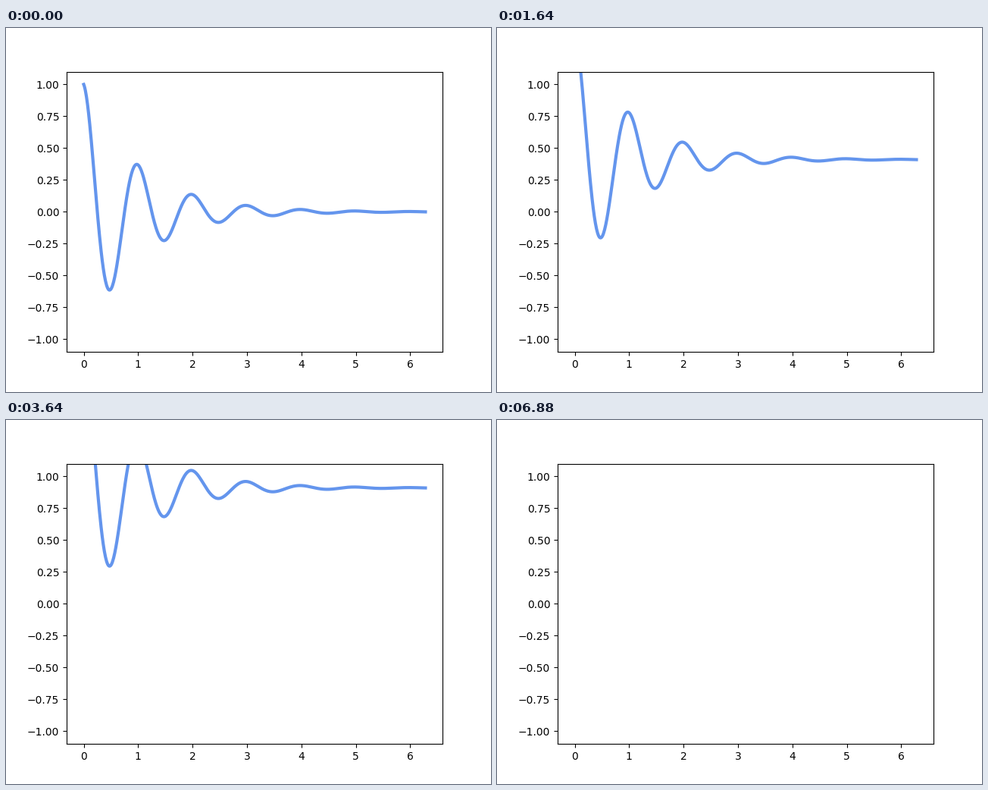
A matplotlib script for the animation above (8 s loop, 640 by 480 pixels).

```python
import matplotlib.pyplot as plt
import numpy as np
from matplotlib.animation import FuncAnimation

FRAMES, INTERVAL = 200, 40
RISE_PER_FRAME = 0.01

x = np.arange(0, 2 * np.pi, 0.01)
wave = np.exp(-x) * np.cos(2 * np.pi * x)

fig, ax = plt.subplots(figsize=(6.4, 4.8), dpi=100)
line, = ax.plot(x, wave, color="cornflowerblue", lw=3)
ax.set_ylim(-1.1, 1.1)


def update(frame):
    line.set_ydata(wave + RISE_PER_FRAME * frame)
    return line,


anim = FuncAnimation(fig, update, frames=FRAMES, interval=INTERVAL,
                     repeat=True, repeat_delay=0)
plt.show()
```
